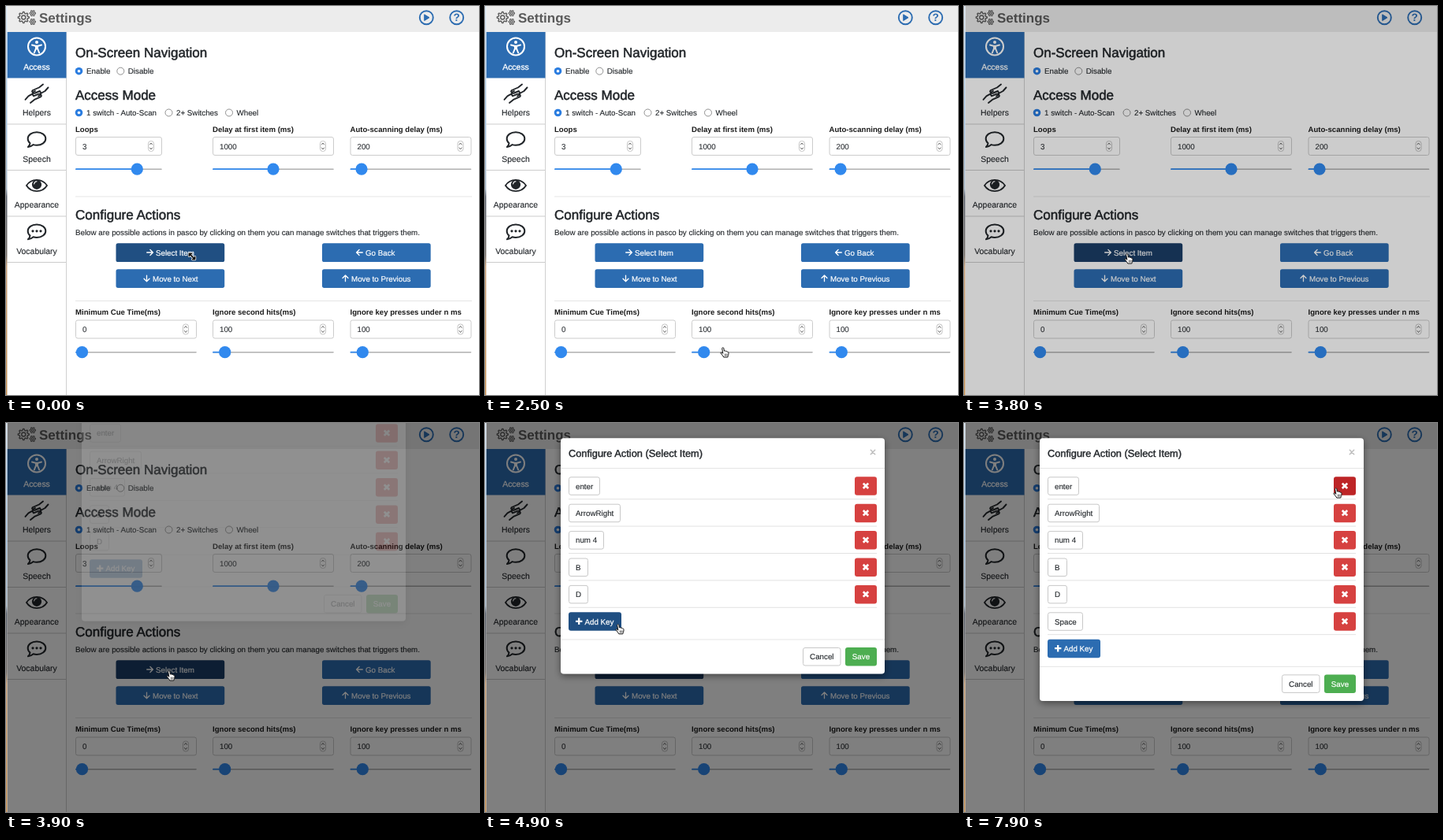
Animation, 600 px wide and 494 px high, one loop 8000 ms. Source, as an HTML page:

```html
<!DOCTYPE html>
<html lang="en">
<head>
<meta charset="utf-8">
<title>Settings</title>
<style>
html, body { margin: 0; width: 100%; height: 100%; overflow: hidden; background: #fff; }
svg { display: block; width: 100%; height: 100%; font-family: "Liberation Sans", Arial, sans-serif; }
text { text-rendering: geometricPrecision; }
</style>
</head>
<body>
<svg id="stage" viewBox="0 0 600 494">
  <defs>
    <linearGradient id="desk" x2="0" y2="1">
      <stop offset="0" stop-color="#dce9f5"/><stop offset=".3" stop-color="#a9c6e2"/>
      <stop offset=".47" stop-color="#a9b9c8"/><stop offset=".49" stop-color="#5d6470"/>
      <stop offset=".64" stop-color="#77716c"/><stop offset=".67" stop-color="#c9a27c"/>
      <stop offset="1" stop-color="#c79357"/>
    </linearGradient>
    <filter id="shadow" x="-10%" y="-10%" width="120%" height="125%">
      <feDropShadow dx="0" dy="3" stdDeviation="5" flood-opacity=".45"/>
    </filter>
  </defs>
  <g id="page"></g>
  <rect id="backdrop" x="1.5" width="598.5" height="494"/>
  <g id="modal"></g>
  <rect width="1.5" height="494" fill="url(#desk)"/>
  <g id="cursor"></g>
</svg>
<script>
const LOOP = 8000, STEP = 100;
const BLUE = '#2c6cb1', BLUE_HOVER = '#204f82', BLUE_FOCUS = '#1a3d66', THUMB = '#3189ee';
const INK = '#212529', FONT = 9.77, ROW = 34.4;
const CLICK = 3600, FADE_BACKDROP = 3740, FADE_MODAL = 3880, ADD_ROW = 5400, KEY_PRESS = 6800;
const $ = id => document.getElementById(id);
const clamp = v => Math.max(0, Math.min(1, v));

// "heft" thickens regular glyphs towards a medium weight
function text(x, y, str, { size = FONT, fill = INK, bold = false, heft = bold ? 0 : .12, anchor = 'start' } = {}) {
  return `<text x="${x}" y="${y}" font-size="${size}" fill="${fill}" text-anchor="${anchor}"` +
    (bold ? ' font-weight="700"' : '') +
    (heft ? ` stroke="${fill}" stroke-width="${heft}"` : '') + `>${str}</text>`;
}
const rect = (x, y, w, h, fill, stroke = 'none', r = 0) =>
  `<rect x="${x}" y="${y}" width="${w}" height="${h}" rx="${r}" fill="${fill}" stroke="${stroke}"/>`;
const line = (d, stroke, width = 1, fill = 'none') =>
  `<path d="${d}" stroke="${stroke}" stroke-width="${width}" fill="${fill}" stroke-linecap="round" stroke-linejoin="round"/>`;
const circle = (x, y, r, fill, stroke = 'none', width = 1) =>
  `<circle cx="${x}" cy="${y}" r="${r}" fill="${fill}" stroke="${stroke}" stroke-width="${width}"/>`;
const heading = (y, str) => text(88, y, str, { size: 17, heft: .5 });
const rule = (x1, x2, y, color = '#e5e5e5') => `<path d="M${x1} ${y}H${x2}" stroke="${color}"/>`;

function gear(x, y, r, teeth, width) {
  const points = Array.from({ length: teeth * 4 }, (_, i) => {
    const a = (i - .5) * Math.PI / teeth / 2, rad = i % 4 < 2 ? r : r * .74;
    return `${(x + rad * Math.cos(a)).toFixed(2)} ${(y + rad * Math.sin(a)).toFixed(2)}`;
  });
  return line(`M${points.join('L')}Z`, '#5c5c5c', width) + circle(x, y, r * .36, 'none', '#5c5c5c', width);
}

function header() {
  return rect(1.5, 0, 599, 33, '#ececec') +
    gear(22.3, 14.5, 7, 8, 1.4) + gear(33.8, 9.2, 3.7, 6, 1.1) + gear(33.8, 20, 3.7, 6, 1.1) +
    text(42, 20.7, 'Settings', { size: 17, fill: '#5a5a5a', bold: true }) +
    circle(533.3, 14.7, 8.5, 'none', BLUE, 1.9) + line('M531 11L537 14.7L531 18.4Z', BLUE, 1, BLUE) +
    circle(571.7, 14.7, 8.5, 'none', BLUE, 1.9) +
    text(571.7, 19.4, '?', { size: 13.5, fill: BLUE, bold: true, anchor: 'middle' });
}

const bubble = y => line(`M39 ${y - 9}c6.5 0 11.3 3.6 11.3 8.2s-4.8 8.2-11.3 8.2c-1.6 0-3-.2-4.3-.6` +
  `c-2 1.8-4.2 2.8-6.7 3c1.6-1.5 2.4-3 2.5-4.8c-1.8-1.5-2.8-3.5-2.8-5.8c0-4.6 4.8-8.2 11.3-8.2Z`, INK, 2);

function sidebar() {
  const hand = line('M47 99.5L42 103.5L34 107C32 109 34.5 111.5 37 110.5L43 108C45 110.5 44.5 113 41 114.5' +
    'M53.5 103.5L49.5 108L45 110.5', INK, 1.9);
  const icons = [
    circle(39, 51.5, 11, 'none', '#fff', 2) + circle(39, 46, 2, '#fff') +
      line('M33 49.5L37.5 50.7H40.5L45 49.5M38 51V54L35.8 59.5M40 51V54L42.2 59.5', '#fff', 2) +
      line('M38 51H40V54.5H38Z', '#fff', 1.6, '#fff'),
    hand + `<g transform="rotate(180 39 111.2)">${hand}</g>`,
    bubble(169.3),
    line('M26 228C32 218.5 46 218.5 52 228C46 237.5 32 237.5 26 228Z', INK, 1.9) +
      circle(39, 226.8, 6.1, INK) + line('M35.7 226C36 223.9 37.2 223 39 222.8', '#fff', 1.1),
    bubble(286.5) + [34, 39, 44].map(x => circle(x, 285.8, 1.6, INK)).join('')
  ];
  const names = ['Access', 'Helpers', 'Speech', 'Appearance', 'Vocabulary'];
  let out = `<path d="M76.5 33V494" stroke="#d0d0d0"/>` + rect(1.5, 33, 75, 58.5, BLUE);
  names.forEach((name, i) => {
    out += icons[i] + text(39, 80.6 + i * 58.5, name,
      { size: 10.45, fill: i ? INK : '#fff', heft: i ? .1 : .3, anchor: 'middle' });
    if (i) out += rule(1.5, 76.5, 91.5 + i * 58.5, '#ccc');
  });
  return out;
}

function radio(x, y, label, on) {
  return (on ? circle(x, y, 4.8, '#2b7de0') + circle(x, y, 1.8, '#fff')
             : circle(x, y, 4.5, '#fff', '#858585', .9)) + text(x + 9.5, y + 3.6, label);
}

function field(x, y, w, label, value, thumb) {
  const sx = x + w - 14, mid = y + 22, track = y + 51.2;
  return text(x, y + 3.5, label, { size: 9.6, bold: true, fill: '#1b1b1b' }) +
    rect(x + .5, y + 10.5, w - 1, 23, '#fff', '#ccc', 2.5) + text(x + 9, mid + 3.6, value, { fill: '#2f3337' }) +
    rect(sx - 3.5, mid - 6.5, 7, 13, '#fff', '#c4c4c4', 3.2) +
    line(`M${sx - 1.6} ${mid - 2}l1.6 -2l1.6 2M${sx - 1.6} ${mid + 2}l1.6 2l1.6 -2`, '#555', .9) +
    line(`M${x + 1} ${track}H${x + w - 1}`, '#b0b0b0', 1.6) +
    line(`M${x + 1} ${track}H${thumb}`, THUMB, 1.8) + circle(thumb, track, 7.6, THUMB);
}

const ACTIONS = [
  { x: 139.5, y: 301.3, label: 'Select Item', at: 190, turn: 0 },
  { x: 401, y: 301.3, label: 'Go Back', at: 456, turn: 180 },
  { x: 139.5, y: 334.2, label: 'Move to Next', at: 186, turn: 90 },
  { x: 401, y: 334.2, label: 'Move to Previous', at: 438, turn: -90 }
];
const inside = (p, x, y, w, h) => p.x >= x && p.x <= x + w && p.y >= y && p.y <= y + h;

function actionButton(a, hot, focused) {
  const over = hot && inside(hot, a.x, a.y, 137.5, 23.5);
  const fill = focused ? BLUE_FOCUS : over ? BLUE_HOVER : BLUE;
  return rect(a.x, a.y, 137.7, 23.7, fill, 'none', 2.6) +
    `<g transform="translate(${a.at - 7.5} ${a.y + 11.7}) rotate(${a.turn})">` +
    line('M-3.8 0H3.8M.4 -3.5L3.9 0L.4 3.5', '#fff', 1.3) + '</g>' +
    text(a.at, a.y + 15.3, a.label, { fill: '#fff', heft: .2 });
}

const staticPage = rect(0, 0, 600, 494, '#fff') + header() + sidebar() +
  heading(65.3, 'On-Screen Navigation') +
  radio(92.5, 82.7, 'Enable', true) + radio(145.3, 82.7, 'Disable') +
  heading(118.6, 'Access Mode') +
  radio(92.5, 135.5, '1 switch - Auto-Scan', true) + radio(206.5, 135.5, '2+ Switches') + radio(283, 135.5, 'Wheel') +
  field(88, 156, 110, 'Loops', 3, 166.3) +
  field(262, 156, 154, 'Delay at first item (ms)', 1000, 339) +
  field(436.5, 156, 154, 'Auto-scanning delay (ms)', 200, 451) +
  rule(88, 591, 242) + heading(271.1, 'Configure Actions') +
  text(88, 291, 'Below are possible actions in pasco by clicking on them you can manage switches that triggers them.') +
  rule(88, 591, 374.5) +
  field(88, 388.5, 154, 'Minimum Cue Time(ms)', 0, 96.5) +
  field(262, 388.5, 154, 'Ignore second hits(ms)', 100, 277.7) +
  field(436.5, 388.5, 154, 'Ignore key presses under n ms', 100, 452.3);

function modalMarkup(t, hot) {
  const rows = [['enter', 40], ['ArrowRight', 66], ['num 4', 45], ['B', 25], ['D', 25]];
  if (t >= ADD_ROW) rows.push(t < KEY_PRESS ? ['Waiting for key event', 108] : ['Space', 45]);
  const extra = (rows.length - 5) * ROW, addY = 240.3 + extra;
  let out = `<g filter="url(#shadow)">${rect(96, 19.3, 411, 299.3 + extra, '#fff', 'none', 4)}</g>` +
    text(106, 42.7, 'Configure Action (Select Item)', { size: 12.8, heft: .4 }) +
    line('M489.3 34.3L494.7 39.7M494.7 34.3L489.3 39.7', '#bdbdbd', 1.5) + rule(96, 507, 57.5);
  rows.forEach(([name, w], i) => {
    const y = 68.3 + i * ROW, my = y + 11.5;
    const over = inside(hot, 106, y, w, 23), overX = inside(hot, 469, y, 28, 23);
    out += rect(106.5, y + .5, w - 1, 22.5, over ? '#e2e2e2' : '#fff', over ? '#a8a8a8' : '#c8c8c8', 2.5) +
      text(115, y + 15.2, name) +
      rect(469, y, 28, 23.5, overX ? '#bd2426' : '#d64140', 'none', 3) +
      `<path d="M479.8 ${my - 3.2}l6.4 6.4m0 -6.4l-6.4 6.4" stroke="#fff" stroke-width="2.7"/>` +
      rule(106, 497, y + 28.4, '#e2e2e2');
  });
  const overAdd = inside(hot, 106, addY, 67, 23.5);
  return out + rect(106, addY, 67, 23.5, overAdd ? BLUE_HOVER : BLUE, 'none', 3) +
    `<path d="M115 ${addY + 11.5}h8.4m-4.2 -4.2v8.4" stroke="#fff" stroke-width="2.3"/>` +
    text(126.5, addY + 15.2, 'Add Key', { fill: '#fff', heft: .25 }) +
    rule(96, 507, 275 + extra) +
    rect(403.5, 285.5 + extra, 47.5, 22.5, '#fff', '#c8c8c8', 2.5) +
    text(427.3, 300.3 + extra, 'Cancel', { anchor: 'middle' }) +
    rect(457, 285 + extra, 40, 23.5, '#4dae51', 'none', 3) +
    text(477, 300.3 + extra, 'Save', { fill: '#fff', heft: .2, anchor: 'middle' });
}

// time, x, y of the pointer's middle
const PATH = [[0, 236, 318], [600, 236, 318], [1300, 262, 350], [2200, 304, 440], [2600, 304, 440],
  [3300, 209, 321], [4100, 209, 321], [4800, 171, 262], [5400, 171, 260], [6200, 166, 252],
  [7000, 166, 252], [7800, 474, 89], [LOOP, 474, 89]];

function pointerAt(t) {
  const i = PATH.findIndex((p, n) => n && t <= p[0]);
  const [t0, x0, y0] = PATH[i - 1], [t1, x1, y1] = PATH[i];
  const u = (t - t0) / (t1 - t0), e = u * u * (3 - 2 * u);
  return { x: x0 + (x1 - x0) * e, y: y0 + (y1 - y0) * e };
}

const DIAGONAL = 'M-3.6 -3.6L3.6 3.6M-3.6 -.6V-3.6H-.6M3.6 .6V3.6H.6';
const SHAPES = {
  hand: line('M-3.3 -5.2C-3.3 -6.6 -1.3 -6.6 -1.1 -5.2L-.6 -1.8C.2 -2.6 1.3 -2.3 1.5 -1.4C2.3 -2 3.2 -1.6 3.4 -.8' +
    'C4.4 -1.1 5 -.4 5 .6C5 3 4.4 4 3.8 6H-1.2C-2 4 -4 2.4 -5 .9C-5.4 -.3 -3.9 -.5 -2.4 1Z', '#111', 1, '#fff') +
    line('M.2 2V4.3M1.7 2V4.3M3.1 2V4.3', '#111', .6),
  arrow: line('M-3 -6V5L-.6 2.8L1 6.2L2.6 5.5L1 2.2H4.4Z', '#fff', .8, '#111'),
  resize: line(DIAGONAL, '#fff', 3.2) + line(DIAGONAL, '#111', 1.7)
};

function cursorKind(t, hot) {
  if (t < 700) return 'resize';
  const modal = t >= FADE_MODAL + STEP;
  const onPage = ACTIONS.some(a => inside(hot, a.x, a.y, 137.5, 23.5)) || inside(hot, 88, 430, 503, 20);
  const onModal = inside(hot, 106, 68, 108, 196) || inside(hot, 469, 68, 28, 196);
  return (modal ? onModal : onPage) ? 'hand' : 'arrow';
}

function draw(t) {
  const p = pointerAt(t), hot = { x: p.x - 2, y: p.y - 5 };
  const open = t >= FADE_BACKDROP;
  $('page').innerHTML = staticPage +
    ACTIONS.map((a, i) => actionButton(a, open ? null : hot, i === 0 && t >= CLICK)).join('');
  $('backdrop').setAttribute('opacity', .5 * clamp((t - FADE_BACKDROP) / 150));
  const slide = 1 - clamp((t - FADE_MODAL) / 300);
  $('modal').setAttribute('opacity', clamp((t - FADE_MODAL) / 150));
  $('modal').setAttribute('transform', `translate(0 ${-76 * slide ** 1.8})`);
  $('modal').innerHTML = t >= FADE_MODAL ? modalMarkup(t, hot) : '';
  $('cursor').setAttribute('transform', `translate(${p.x} ${p.y})`);
  $('cursor').innerHTML = SHAPES[cursorKind(t, hot)];
}

let shown = -1;
const start = performance.now();
function tick() {
  const t = Math.floor((performance.now() - start) % LOOP / STEP) * STEP;
  if (t !== shown) draw(shown = t);
  requestAnimationFrame(tick);
}
tick();
</script>
</body>
</html>
```
